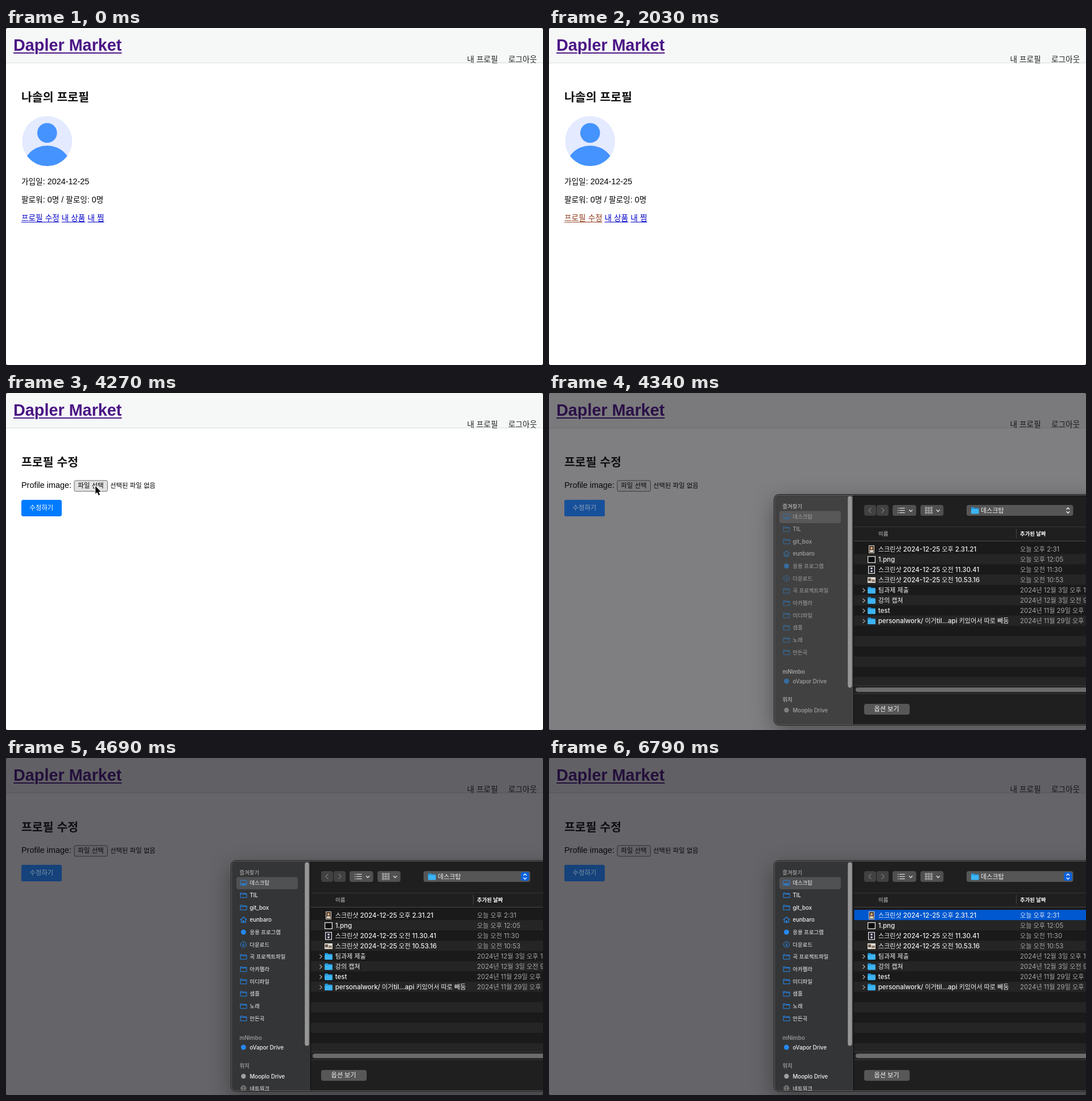
Write an HTML page with a canvas that moves like this. It is 944x593 px and loops after 8 s.

```html
<!DOCTYPE html>
<html lang="ko">
<head>
<meta charset="utf-8">
<title>프로필 수정</title>
<style>
html, body { margin: 0; width: 100%; height: 100%; overflow: hidden; background: #fff; }
canvas { display: block; width: 944px; height: 593px; }
</style>
</head>
<body>
<canvas id="stage"></canvas>
<script>
const W = 944, H = 593, LOOP = 8000;
const canvas = document.getElementById('stage');
const ctx = canvas.getContext('2d');
const dpr = window.devicePixelRatio || 1;
canvas.width = W * dpr;
canvas.height = H * dpr;

const PAGE = { family: '"Liberation Sans", Arial, sans-serif', scale: 1 };
const UI = { family: 'Inter, sans-serif', scale: 0.98 };
const HANGUL = { family: '"Noto Sans CJK KR", "Noto Sans CJK", sans-serif', scale: 0.948 };

// Draws mixed Korean and Latin text; returns the x where it ends.
function text(str, x, y, size, color, weight = 400, face = PAGE) {
  ctx.fillStyle = color;
  for (const run of str.match(/[가-힣]+|[^가-힣]+/g)) {
    const f = /[가-힣]/.test(run) ? HANGUL : face;
    ctx.font = `${weight} ${size * f.scale}px ${f.family}`;
    ctx.fillText(run, x, y);
    x += ctx.measureText(run).width;
  }
  return x;
}

function rect(x, y, w, h, color) {
  ctx.fillStyle = color;
  ctx.fillRect(x, y, w, h);
}

function round(x, y, w, h, r, fill, stroke) {
  ctx.beginPath();
  ctx.roundRect(x, y, w, h, r);
  if (fill) { ctx.fillStyle = fill; ctx.fill(); }
  if (stroke) { ctx.strokeStyle = stroke; ctx.lineWidth = 1; ctx.stroke(); }
}

function disc(x, y, r, color) {
  ctx.beginPath();
  ctx.arc(x, y, r, 0, Math.PI * 2);
  ctx.fillStyle = color;
  ctx.fill();
}

function line(points, color, width = 1) {
  ctx.beginPath();
  points.forEach(([x, y], i) => i ? ctx.lineTo(x, y) : ctx.moveTo(x, y));
  ctx.strokeStyle = color;
  ctx.lineWidth = width;
  ctx.stroke();
}

function link(str, x, y, color) {
  const end = text(str, x, y, 14.4, color);
  rect(x, y + 2, end - x, 1, color);
  return end + 4;
}

function header() {
  rect(0, 0, W, H, '#fff');
  rect(0, 0, W, 61, '#f6f8f8');
  rect(0, 61, W, 1, '#d9dddd');
  const title = 'Dapler Market';
  ctx.font = `700 28.8px ${PAGE.family}`;
  rect(13, 43, ctx.measureText(title).width, 2, '#4b1585');
  ctx.strokeStyle = '#f6f8f8';
  ctx.lineWidth = 4;
  ctx.lineJoin = 'round';
  ctx.strokeText(title, 13, 40);
  text(title, 13, 40, 28.8, '#4b1585', 700);
  text('내 프로필', 810.5, 59.5, 14.4, '#222');
  text('로그아웃', 883, 59.5, 14.4, '#222');
}

function avatar() {
  disc(72.3, 199, 44, '#e4eaff');
  disc(72.3, 184.6, 17.4, '#4593ff');
  ctx.save();
  ctx.beginPath();
  ctx.arc(72.3, 199, 44, 0, Math.PI * 2);
  ctx.clip();
  disc(72.3, 251, 44, '#4593ff');
  ctx.restore();
}

function profilePage(t) {
  text('나솔의 프로필', 27, 129, 21.6, '#111', 700);
  avatar();
  text('가입일: 2024-12-25', 27, 275, 14.4, '#000');
  text('팔로워: 0명 / 팔로잉: 0명', 27, 307, 14.4, '#000');
  const pressed = t >= 2030 && t < 2170;
  let x = link('프로필 수정', 27, 339, pressed ? '#8f3a1c' : '#0000c8');
  x = link('내 상품', x, 339, '#0000c8');
  link('내 찜', x, 339, '#0000c8');
}

function submitButton(fill, label) {
  round(27, 188, 71, 29, 3.5, fill);
  text('수정하기', 41.5, 206.3, 12, label);
}

function editPage(t) {
  text('프로필 수정', 27, 129, 21.6, '#111', 700);
  text('Profile image:', 27, 167.3, 14.4, '#000');
  let face = '#efefef';
  if (t >= 3220) face = '#e2e2e2';
  if (t >= 3430 && t < 3570 || t >= 4340) face = '#f5f5f5';
  round(120, 154, 58.5, 19, 2.5, face, '#6b6b6b');
  text('파일 선택', 126.5, 167.2, 12, '#000');
  text('선택된 파일 없음', 183, 167.2, 12, '#000');
  submitButton('#007bff', '#fff');
}

function cursor(x, y) {
  const shape = new Path2D('M0 0V13.4L3 10.6L5.4 16L7.8 15L5.4 9.7H9.6Z');
  ctx.save();
  ctx.translate(x, y);
  ctx.strokeStyle = '#fff';
  ctx.lineWidth = 2;
  ctx.stroke(shape);
  ctx.fillStyle = '#000';
  ctx.fill(shape);
  ctx.restore();
}

const places = ['데스크탑', 'TIL', 'git_box', 'eunbaro', '응용 프로그램', '다운로드',
  '곡 프로젝트파일', '아카펠라', '미디파일', '샘플', '노래', '만든곡'];

const files = [
  ['스크린샷 2024-12-25 오후 2.31.21', '오늘 오후 2:31'],
  ['1.png', '오늘 오후 12:05'],
  ['스크린샷 2024-12-25 오전 11.30.41', '오늘 오전 11:30'],
  ['스크린샷 2024-12-25 오전 10.53.16', '오늘 오전 10:53'],
  ['팀과제 제출', '2024년 12월 3일 오후 1:20'],
  ['강의 캡쳐', '2024년 12월 3일 오전 9:40'],
  ['test', '2024년 11월 29일 오후 5:10'],
  ['personalwork/ 이거til…api 키있어서 따로 빼둠', '2024년 11월 29일 오후 3:30']
];

function placeIcon(i, y, color) {
  if (i === 0) {
    round(412, y - 4.5, 11, 9, 1.5, null, color);
    rect(413.5, y + 1, 8, 2, color);
  } else if (i === 3) {
    line([[412, y], [417.5, y - 5], [423, y]], color, 1.2);
    line([[413.7, y - 1], [413.7, y + 4.5], [421.3, y + 4.5], [421.3, y - 1]], color, 1.2);
    rect(416.2, y + 1, 2.6, 3.5, color);
  } else if (i === 4) {
    disc(417.5, y, 4.5, color);
  } else if (i === 5) {
    ctx.beginPath();
    ctx.arc(417.5, y, 5, 0, Math.PI * 2);
    ctx.strokeStyle = color;
    ctx.lineWidth = 1;
    ctx.stroke();
    line([[417.5, y - 2.7], [417.5, y + 2.3]], color);
    line([[415.6, y + 0.5], [417.5, y + 2.5], [419.4, y + 0.5]], color);
  } else {
    line([[412, y - 1.8], [412, y - 4], [416, y - 4], [417, y - 3], [423, y - 3],
      [423, y + 4.3], [412, y + 4.3], [412, y - 1.8], [423, y - 1.8]], color);
  }
}

function folder(x, y) {
  round(x, y, 6, 4, 1, '#2596d6');
  round(x, y + 1.5, 13.5, 10, 1.2, '#2596d6');
  round(x, y + 3.2, 13.5, 8.3, 1.2, '#3db4f2');
}

function thumbnail(i, y) {
  if (i === 0) {
    rect(562, y - 7, 10, 14, '#d9cfc4');
    rect(563, y - 6, 8, 12, '#4a3a30');
    disc(567, y - 2, 2.2, '#d8a878');
    rect(564, y + 1.5, 6, 3.5, '#e7dccf');
  } else if (i === 1) {
    rect(560, y - 6, 14, 12, '#eee');
    rect(561.2, y - 4.8, 11.6, 9.6, '#0c0c0c');
  } else if (i === 2) {
    rect(561, y - 7, 12, 14, '#e8e8e8');
    rect(562.2, y - 5.8, 9.6, 11.6, '#20232d');
    rect(565.5, y - 4, 3, 3, '#ddd');
    rect(565.5, y + 1, 3, 3, '#ddd');
  } else {
    rect(560, y - 5, 14, 10, '#e2ddd6');
    rect(561, y - 3, 5, 5, '#6b5848');
    rect(567, y - 1, 6, 4, '#8d7a69');
  }
}

function sidebar(t, active) {
  const label = active ? '#f2f2f2' : '#a3a3a3';
  const blue = active ? '#2589f0' : '#356c9f';
  const gray = active ? '#a0a0a0' : '#808080';
  const head = active ? '#929394' : '#a2a2a2';
  const item = (s, y) => text(s, 428.5, y + 3.6, 9.9, label, 500, UI);
  const section = (s, y) => text(s, 410.5, y + 3.6, 9.9, head, 600, UI);

  rect(396, 181, 139, 406, active ? '#343536' : '#414141');
  section('즐겨찾기', 201.5);
  round(405, 209.5, 108, 21.5, 4, active ? '#505152' : '#585858');
  places.forEach((name, i) => {
    const y = 219.7 + i * 21.68;
    placeIcon(i, y, blue);
    item(name, y);
  });
  section('mNimbo', 492);
  disc(417.5, 509, 4.5, blue);
  item('oVapor Drive', 509);
  section('위치', 541);
  disc(417.5, 560, 4.2, gray);
  item('Mooplo Drive', 560);
  const settled = t >= 4690;
  if (settled) {
    ctx.beginPath();
    ctx.arc(417.5, 581, 4.5, 0, Math.PI * 2);
    ctx.moveTo(419.5, 581);
    ctx.ellipse(417.5, 581, 2, 4.5, 0, 0, Math.PI * 2);
    ctx.moveTo(413, 581);
    ctx.lineTo(422, 581);
    ctx.strokeStyle = gray;
    ctx.lineWidth = 0.9;
    ctx.stroke();
    item('네트워크', 581);
  }
  round(525.3, 183.5, 7.4, settled ? 323 : 337, 3.7, '#979797');
  rect(535, 181, 1, 406, '#080808');
}

function toolbar(active) {
  round(554, 199, 21, 19, 4, '#414141');
  round(576, 199, 21, 19, 4, '#414141');
  line([[566.5, 204], [562, 208.5], [566.5, 213]], '#777', 1.2);
  line([[584.5, 204], [589, 208.5], [584.5, 213]], '#777', 1.2);

  round(604, 199, 41.5, 19, 4, '#505050');
  for (let i = 0; i < 3; i++) {
    const y = 204.5 + i * 4;
    rect(613, y - 0.5, 1.5, 1.3, '#ddd');
    rect(616, y - 0.5, 9.5, 1.2, '#ddd');
  }
  round(653, 199, 40.5, 19, 4, '#505050');
  for (let i = 0; i < 9; i++) {
    const x = 661 + (i % 3) * 4.7, y = 202.5 + Math.floor(i / 3) * 4.3;
    round(x + 0.5, y + 0.5, 2.8, 2.4, 0.4, null, '#ccc');
  }
  for (const x of [636, 684]) line([[x - 3, 207.5], [x, 210.5], [x + 3, 207.5]], '#ddd', 1.3);

  round(734, 199, 187.5, 19, 4, '#565656');
  folder(742, 203);
  text('데스크탑', 759, 212.8, 11.7, '#f2f2f2', 500, UI);
  if (active) round(905, 201, 14.5, 15, 3.5, '#0a62dc');
  line([[909.5, 206.8], [912.3, 204], [915.1, 206.8]], '#fff', 1.3);
  line([[909.5, 210.4], [912.3, 213.2], [915.1, 210.4]], '#fff', 1.3);
}

function fileList(t) {
  const top = 267.2, pitch = 18.05;
  rect(536, 237, W, 1, '#383838');
  text('이름', 579, 253, 9.9, '#cfcfcf', 400, UI);
  rect(821, 241, 1, 17, '#444');
  text('추가된 날짜', 828, 253, 9.9, '#fff', 700, UI);
  rect(536, 262, W, 1, '#4a4a4a');
  rect(536, 263, W, 254, '#1a1a1a');
  for (let y = top + pitch; y < 517; y += pitch * 2) {
    rect(536, y, W, Math.min(pitch, 517 - y), '#252525');
  }
  const selected = t >= 6510;
  if (selected) rect(536.5, top, W, pitch, '#0058d0');

  files.forEach(([name, date], i) => {
    const y = 277 + i * pitch;
    if (i < 4) thumbnail(i, y);
    else {
      line([[551.5, y - 3.5], [555.3, y], [551.5, y + 3.5]], '#aaa', 1.2);
      folder(560.3, y - 6);
    }
    text(name, 578.7, y + 4.1, 11.7, '#f0f0f0', 500, UI);
    text(date, 828, y + 4.1, 11.7, selected && i === 0 ? '#d5e2f6' : '#a6a6a6', 400, UI);
  });

  rect(536, 517, W, 14, '#222');
  rect(536, 516.5, W, 1, '#3c3c3c');
  round(539, 520.3, 500, 7.6, 3.8, '#6c6c6c');
  rect(536, 530.5, W, 1, '#3a3a3a');
}

function dialog(t) {
  const active = t >= 4550;
  const dy = t < 4550 ? -2 : t < 4620 ? -1 : 0;
  ctx.save();
  ctx.translate(0, dy);

  ctx.save();
  ctx.shadowColor = 'rgba(0,0,0,.4)';
  ctx.shadowBlur = 38 * dpr;
  ctx.shadowOffsetY = 12 * dpr;
  round(396, 181, 640, 405, 8, '#1f1f1f');
  ctx.restore();

  ctx.save();
  ctx.beginPath();
  ctx.roundRect(396, 181, 640, 405, 8);
  ctx.clip();
  rect(536, 181, W, 406, '#1f1f1f');
  sidebar(t, active);
  toolbar(active);
  fileList(t);
  round(554, 549, 80, 19, 4, '#575757');
  text('옵션 보기', 571.5, 562.4, 11.7, '#f5f5f5', 500, UI);
  ctx.restore();

  round(395.5, 180.5, 641, 406, 8.5, null, '#181818');
  round(396.5, 181.5, 640, 404, 7.5, null, '#646464');
  ctx.restore();
}

function windowCorners() {
  for (const [x, y] of [[0, 0], [W, 0], [0, H], [W, H]]) {
    const sx = x ? -1 : 1, sy = y ? -1 : 1;
    ctx.beginPath();
    ctx.moveTo(x, y);
    ctx.lineTo(x + 2 * sx, y);
    ctx.lineTo(x, y + 2 * sy);
    ctx.fillStyle = '#333';
    ctx.fill();
  }
}

function draw(t) {
  ctx.setTransform(dpr, 0, 0, dpr, 0, 0);
  header();
  if (t < 2310) profilePage(t);
  else editPage(t);
  if (t >= 3920 && t < 4340) cursor(157.3, 164);
  if (t >= 4340) {
    const dimming = t < 4410;
    rect(0, 0, W, H, `rgba(14,12,18,${dimming ? 0.53 : 0.636})`);
    // The blue button stays more vivid than the dimmed page.
    submitButton(dimming ? '#17509a' : '#15427a', dimming ? '#8fa3bb' : '#7b91aa');
    dialog(t);
  }
  windowCorners();
}

function tick() {
  draw(performance.now() % LOOP);
  requestAnimationFrame(tick);
}
tick();
</script>
</body>
</html>
```
